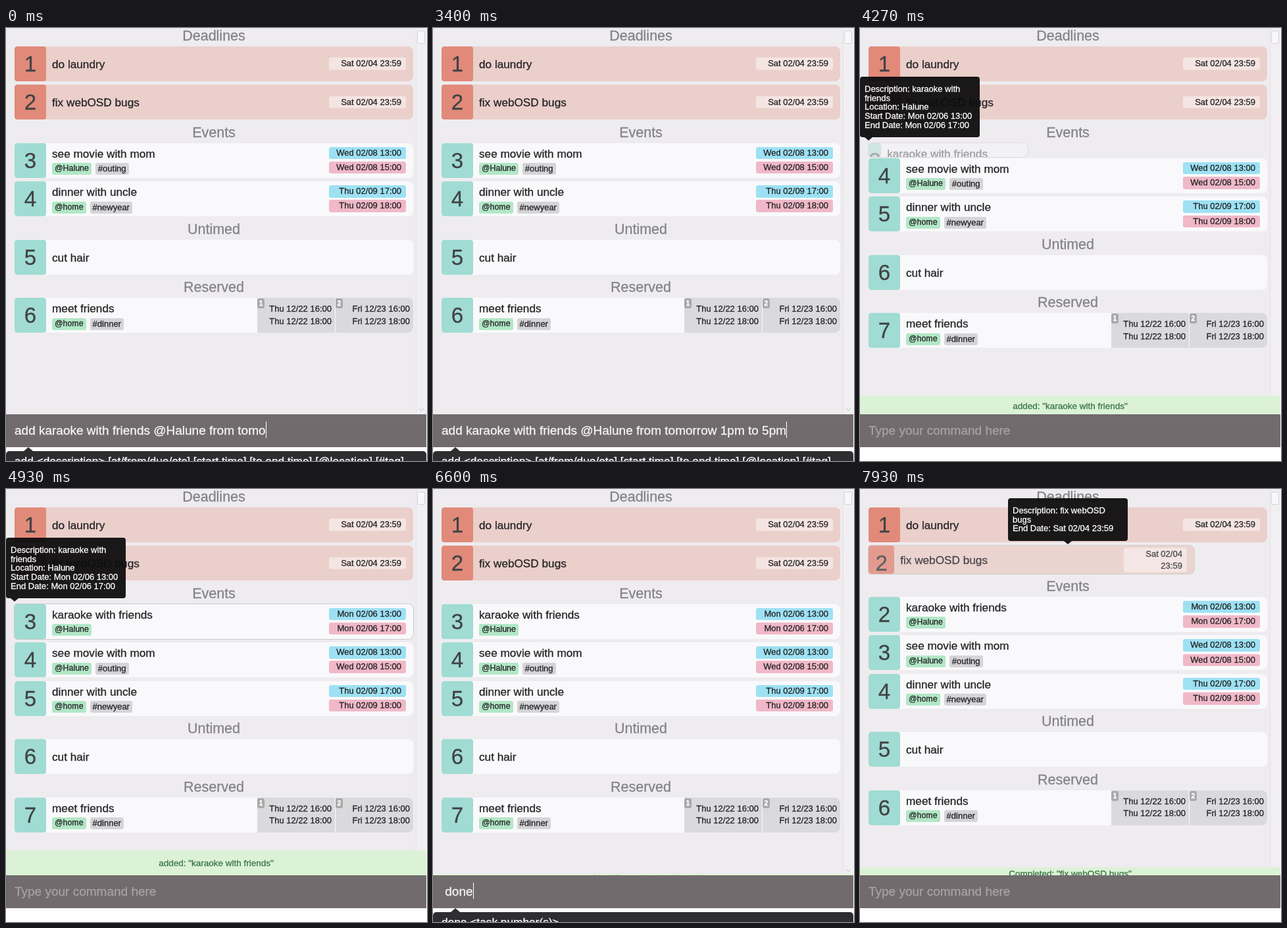
An HTML page that plays this animation: 640x658 px, repeating every 8 s.

```html
<!DOCTYPE html>
<html lang="en">
<head>
<meta charset="utf-8">
<title>Task list</title>
<style>
html, body { margin: 0; width: 100%; height: 100%; overflow: hidden; background: #fff; }
#stage {
  position: relative; width: 640px; height: 658px; overflow: hidden; color: #242426;
  font-family: "Liberation Sans", Arial, sans-serif; -webkit-text-stroke: .3px;
}
#stage div, #stage span { box-sizing: border-box; }
#list { position: absolute; left: 0; top: 0; width: 639px; height: 587px; background: #eeecef; overflow: hidden; }
#rows { position: absolute; left: 13px; top: -2.5px; width: 606px; }
.head { height: 30px; line-height: 29px; font-size: 21.5px; text-align: center; color: #848386; }
.row { position: relative; overflow: hidden; border-radius: 4px 8px 8px 4px; background: #f9f9fb; }
.row.hot { box-shadow: 0 0 0 1px #c9c9cb; }
.due { background: #ebcfca; }
.num {
  position: absolute; left: 0; top: 0; height: 100%; border-radius: 4px; background: #a0dcd3; color: #414345;
  font-size: 33px; line-height: 54px; text-align: center; overflow: hidden;
}
.due .num { background: #e18a7a; }
.name { position: absolute; white-space: nowrap; font-size: 17.2px; line-height: 20px; top: 6px; }
.mid .name { top: 50%; margin-top: -9.5px; }
.tags { position: absolute; left: 57px; top: 30.5px; display: flex; gap: 6px; }
.tag { height: 18px; line-height: 17px; padding: 0 4px; border-radius: 3px; font-size: 13px; background: #d5d4d7; }
.loc { font-size: 12.4px; background: #b2e7c6; }
.time {
  position: absolute; right: 11px; width: 117px; padding: 0 7px; border-radius: 3px;
  font-size: 13px; line-height: 18.5px; text-align: right;
}
.due .time { top: 50%; transform: translateY(-50%); background: #f5e5e2; }
.start { top: 6px; background: #9de1f3; }
.end { top: 28.3px; background: #f0b8c8; }
.slot {
  position: absolute; top: 0; width: 118px; height: 53px; padding: 8px 5px 0 0; background: #dadadc;
  font-size: 13px; line-height: 18.5px; text-align: right;
}
.slot b {
  position: absolute; left: 0; top: 1px; width: 11px; height: 15px; border-radius: 3px;
  background: #a9a9ab; color: #fff; font-size: 10.5px; line-height: 15px; text-align: center;
}
#bar { position: absolute; left: 623px; top: 0; width: 15px; height: 587px; background: #f1eff2; border-left: 1px solid #e4e2e5; }
#thumb { position: absolute; left: 1px; top: 4px; width: 12px; height: 20px; border: 1px solid #d6d4d7; border-radius: 2px; background: #f7f6f8; }
#bar svg { position: absolute; left: 3px; top: 577px; }
#msg {
  position: absolute; left: 0; bottom: 71px; width: 639px; overflow: hidden; background: #dcf2d6; color: #3a7547;
  font-size: 13.5px; line-height: 12px; text-align: center;
}
#msg span { position: relative; display: block; }
.tip {
  position: absolute; width: 182px; padding: 12px 0 11.5px 7px; border-radius: 4px; background: rgba(12, 12, 13, .94);
  color: #fff; font-size: 13px; line-height: 13.7px; white-space: nowrap;
}
.tip::after, #hint::after {
  content: ""; position: absolute; left: var(--x); top: 100%; margin-left: -6px;
  border: solid transparent; border-width: 5px 6px 0; border-top-color: rgba(12, 12, 13, .94);
}
#tipAdd { left: 0; top: 74px; --x: 13px; }
#tipDone { left: 225px; top: 14px; --x: 91px; }
#cmd {
  position: absolute; left: 0; top: 587px; width: 639px; height: 50px; padding-left: 13px;
  background: #716b6d; color: #f6f5f6; font-size: 19px; line-height: 50px; white-space: pre;
}
#cmd.empty { color: #a7a2a4; }
#caret { position: absolute; top: 11px; width: 1px; height: 25px; background: #fff; }
#hint {
  position: absolute; left: 0; top: 643px; width: 639px; height: 40px; padding-left: 13px; border-radius: 5px;
  background: #2e2d2f; color: #fff; font-size: 17.3px; line-height: 30px; white-space: pre;
}
#hint::after { left: 33px; top: -6px; border-width: 0 7px 6px; border-bottom-color: #2e2d2f; }
</style>
</head>
<body>
<div id="stage">
  <div id="list">
    <div id="rows"></div>
    <div id="bar"><div id="thumb"></div><svg width="9" height="6"><path d="M1 1L4.500 4.500L8 1" fill="none" stroke="#bbb9bc"/></svg></div>
  </div>
  <div id="msg"><span></span></div>
  <div class="tip" id="tipAdd">Description: karaoke with<br>friends<br>Location: Halune<br>Start Date: Mon 02/06 13:00<br>End Date: Mon 02/06 17:00</div>
  <div class="tip" id="tipDone">Description: fix webOSD<br>bugs<br>End Date: Sat 02/04 23:59</div>
  <div id="cmd"><span></span><div id="caret"></div></div>
  <div id="hint"></div>
</div>
<script>
const LOOP = 8000, ADD = 4010, CLEAR = 6010, CLOSE = 6260, DONE = 7762;
const $ = s => document.querySelector(s);

const sections = [
  ["Deadlines", [
    { name: "do laundry", due: "Sat 02/04 23:59" },
    { name: "fix webOSD bugs", due: "Sat 02/04 23:59" }]],
  ["Events", [
    { name: "karaoke with friends", tags: ["@Halune"], from: "Mon 02/06 13:00", to: "Mon 02/06 17:00" },
    { name: "see movie with mom", tags: ["@Halune", "#outing"], from: "Wed 02/08 13:00", to: "Wed 02/08 15:00" },
    { name: "dinner with uncle", tags: ["@home", "#newyear"], from: "Thu 02/09 17:00", to: "Thu 02/09 18:00" }]],
  ["Untimed", [{ name: "cut hair" }]],
  ["Reserved", [
    { name: "meet friends", tags: ["@home", "#dinner"],
      slots: [["Thu 12/22 16:00", "Thu 12/22 18:00"], ["Fri 12/23 16:00", "Fri 12/23 18:00"]] }]]
];

function el(parent, cls, text = "") {
  const e = document.createElement("div");
  e.className = cls;
  e.textContent = text;
  return parent.appendChild(e);
}

function build(task) {
  const row = el($("#rows"), "row" + (task.due ? " due" : "") + (task.tags ? "" : " mid"));
  const num = el(row, "num"), name = el(row, "name", task.name), times = [];
  if (task.tags) {
    const tags = el(row, "tags");
    task.tags.forEach(s => el(tags, s[0] === "@" ? "tag loc" : "tag", s));
  }
  if (task.due) times.push(el(row, "time", task.due));
  if (task.from) times.push(el(row, "time start", task.from), el(row, "time end", task.to));
  (task.slots || []).forEach((slot, i) => {
    const box = el(row, "slot");
    box.style.left = 369 + i * 119 + "px";
    box.innerHTML = `<b>${i + 1}</b>${slot.join("<br>")}`;
  });
  return { row, num, name, times, due: task.due };
}

const rows = sections.flatMap(([title, tasks]) => {
  el($("#rows"), "head", title);
  return tasks.map(build);
});
const bugs = rows[1], karaoke = rows[2];

function resize({ row, num, name, times, due }, f) {
  const s = row.style;
  s.display = f > 0 ? "" : "none";
  s.width = 606 * f + "px";
  s.height = 53 * f + "px";
  s.marginBottom = 5.5 * f + "px";
  s.opacity = f;
  num.style.width = 48 * f + "px";
  name.style.left = 48 * f + 9 + "px";
  times.forEach(e => {
    e.style.width = 117 * (due ? f : 1) + "px";
    e.style.visibility = f > .6 ? "" : "hidden";
  });
}
rows.forEach(r => resize(r, 1));

const clamp = x => Math.min(1, Math.max(0, x));
const swing = (t, start, dur) => .5 - Math.cos(Math.PI * clamp((t - start) / dur)) / 2;

const typed = [
  { base: "add karaoke with friends @Halune from tomo", rest: "rrow 1pm to 5pm", enter: ADD,
    keys: [130, 330, 530, 720, 950, 1200, 1450, 1660, 1930, 2100, 2260, 2460, 2720, 2930, 3080] },
  { base: "", rest: " done 2", enter: DONE, keys: [5700, 5960, 6130, 6320, 6500, 6800, 7100] }
];

function command(t) {
  const c = typed[t < ADD ? 0 : 1];
  const n = t < c.enter ? c.keys.filter(k => k <= t).length : 0;
  const text = t < c.enter ? c.base + c.rest.slice(0, n) : "";
  const idle = t - (n ? c.keys[n - 1] : 0);
  const label = $("#cmd span"), caret = $("#caret");
  label.textContent = text || "Type your command here";
  $("#cmd").className = text ? "" : "empty";
  caret.style.left = 13 + label.getBoundingClientRect().width + "px";
  caret.style.display = text && idle % 1000 < 500 ? "" : "none";
  const hint = t < ADD ? "add <description> [at/from/due/etc] [start time] [to end time] [@location] [#tag]"
    : text.trim() ? "done <task number(s)>" : "";
  $("#hint").textContent = hint;
  $("#hint").style.display = hint ? "" : "none";
}

function message(t) {
  const f = t < DONE ? swing(t, ADD, 400) - swing(t, CLOSE, 400) : swing(t, DONE + 15, 400);
  const label = $("#msg span");
  $("#msg").style.height = 38 * f + "px";
  label.style.top = 13.5 * f + "px";
  label.textContent = t < DONE ? 'added: "karaoke with friends"' : 'Completed: "fix webOSD bugs"';
}

function render(t) {
  resize(karaoke, swing(t, ADD, 600));
  resize(bugs, 1 - swing(t, DONE, 600));
  karaoke.row.classList.toggle("hot", t >= ADD && t < CLEAR);
  bugs.row.classList.toggle("hot", t >= DONE);

  let n = 0;
  rows.forEach(r => {
    const counted = r === karaoke ? t >= ADD : r === bugs ? t < DONE : true;
    if (counted) n++;
    r.num.textContent = counted ? n : 2;
  });

  $("#tipAdd").style.opacity = clamp((t - ADD) / 150) - clamp((t - CLEAR) / 150);
  $("#tipDone").style.opacity = clamp((t - DONE) / 150);
  command(t);
  message(t);
}

function tick() {
  render(performance.now() % LOOP);
  requestAnimationFrame(tick);
}
tick();
</script>
</body>
</html>
```
